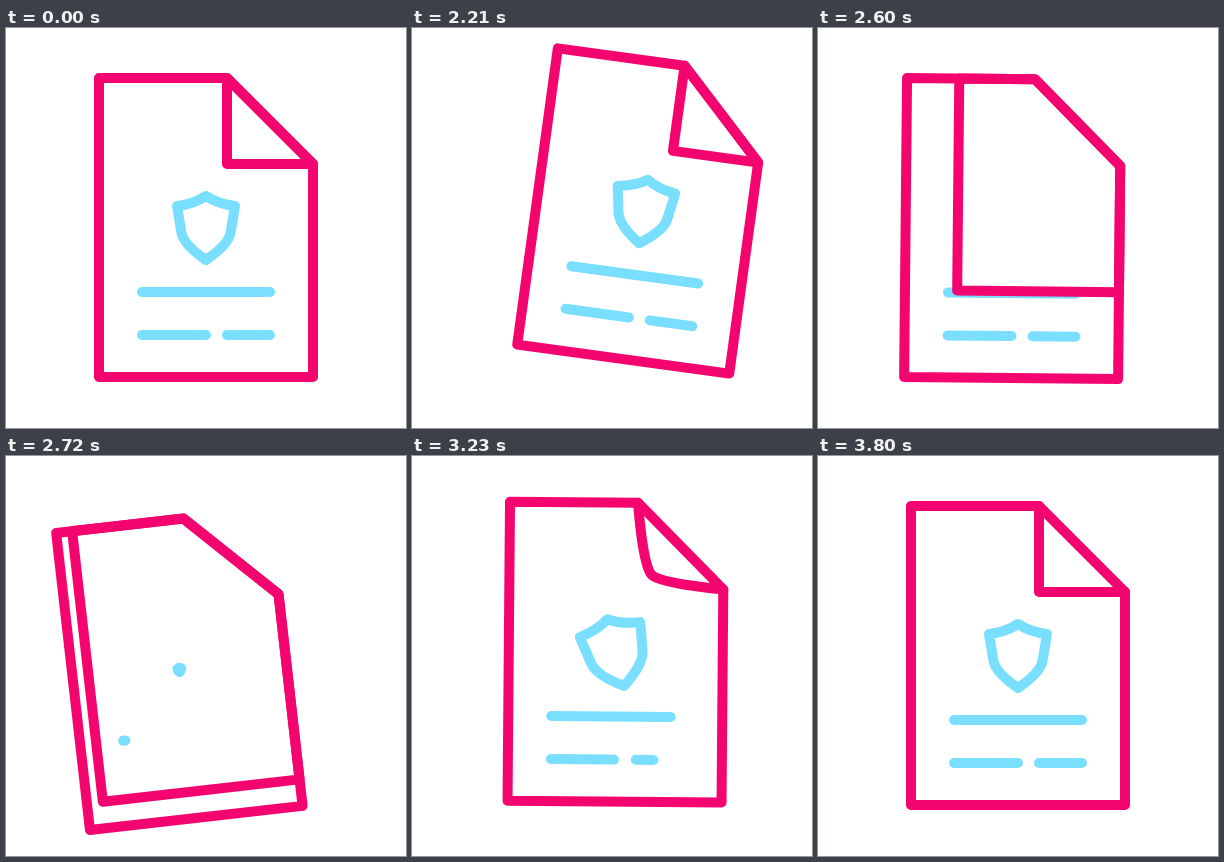
An HTML page with a canvas that plays this animation: 400x400 px, repeating every 3860 ms.

```html
<!DOCTYPE html>
<html lang="en">
<head>
<meta charset="utf-8">
<title>Protected document</title>
<style>
html, body { margin: 0; width: 100%; height: 100%; overflow: hidden; background: #fff; }
canvas { display: block; width: 100vmin; height: 100vmin; }
</style>
</head>
<body>
<canvas id="stage" width="400" height="400"></canvas>
<script>
const ctx = document.getElementById('stage').getContext('2d');
const PINK = '#f4046f', CYAN = '#7adfff';
const LOOP = 3860, HOLD = 2000, STEP = 30, LAST = 60;
const L = 93, R = 307, T = 50, B = 349;
const CX = 200, CY = 199.5, CUT = 86;

const clamp = v => Math.min(1, Math.max(0, v));
const mix = (a, b, p) => a + (b - a) * p;

// cubic-bezier(.333, 0, .25, 1)
function ease(u) {
  if (u <= 0) return 0;
  if (u >= 1) return 1;
  let lo = 0, hi = 1, s = 0.5;
  for (let i = 0; i < 24; i++) {
    s = (lo + hi) / 2;
    const q = 1 - s;
    const x = q * q * s + 0.75 * q * s * s + s * s * s;
    if (x < u) lo = s; else hi = s;
  }
  return s * s * (3 - 2 * s);
}

const span = (k, from, to) => ease(clamp((k - from) / (to - from)));

// keys: [step, value] pairs, eased between neighbours
function track(k, keys) {
  let v = keys[0][1];
  for (let i = 1; i < keys.length; i++) {
    const [from, a] = keys[i - 1], [to, b] = keys[i];
    if (k >= from) v = mix(a, b, span(k, from, to));
  }
  return v;
}

const MOVE_X = [[0, 0], [13, 39], [31, -36], [50, 14], [60, 0]];
const MOVE_Y = [[0, 0], [13.5, -21], [31.5, 20], [50, -10], [60, 0]];
const TILT = [[0, 0], [14, 10.2], [32, -10], [50, 3.7], [60, 0]];
const POP = [[22, 0], [38, 1.08], [60, 1]];
const TWIST = [[31, 0], [41, -14.5], [58, 0]];

function line(x1, x2, y, p) {
  if (p <= 0) return;
  ctx.beginPath();
  ctx.moveTo(x1, y);
  ctx.lineTo(mix(x1, x2, p), y);
  ctx.stroke();
}

function shield(scale, deg) {
  if (scale <= 0) return;
  ctx.save();
  ctx.translate(CX, 200);
  ctx.rotate(deg * Math.PI / 180);
  ctx.scale(scale, scale);
  ctx.beginPath();
  ctx.moveTo(0, -32);
  ctx.quadraticCurveTo(12, -24, 29, -22);
  ctx.lineTo(24.5, 5);
  ctx.quadraticCurveTo(22, 17, 0, 32);
  ctx.quadraticCurveTo(-22, 17, -24.5, 5);
  ctx.lineTo(-29, -22);
  ctx.quadraticCurveTo(-12, -24, 0, -32);
  ctx.closePath();
  ctx.restore();
  ctx.stroke();
}

function content(scale, deg, a, b, c) {
  ctx.strokeStyle = CYAN;
  shield(scale, deg);
  line(136, 264, 264, a);
  line(136, 200, 307, b);
  line(221, 264, 307, c);
}

// the flap spreads until it covers the whole sheet
function flapPath(p) {
  const x = mix(R - CUT, L, p), y = mix(T + CUT, B, p);
  ctx.beginPath();
  ctx.moveTo(R - CUT, T);
  ctx.lineTo(x, T);
  ctx.lineTo(x, y);
  ctx.lineTo(R, y);
  ctx.lineTo(R, T + CUT);
  ctx.closePath();
}

// a new corner curls inward from the diagonal
function curl(p) {
  const d = mix(CUT / 2, CUT, p), h = 28 * (1 - p);
  const x = R - d, y = T + d;
  ctx.beginPath();
  ctx.moveTo(R - CUT, T);
  ctx.bezierCurveTo(R - CUT, T, x - h, y - h, x, y);
  ctx.bezierCurveTo(x + h, y + h, R, T + CUT, R, T + CUT);
  ctx.stroke();
}

function sheet() {
  ctx.beginPath();
  ctx.moveTo(L, T);
  ctx.lineTo(R - CUT, T);
  ctx.lineTo(R, T + CUT);
  ctx.lineTo(R, B);
  ctx.lineTo(L, B);
  ctx.closePath();
  ctx.stroke();
}

function draw(k) {
  ctx.fillStyle = '#fff';
  ctx.fillRect(0, 0, 400, 400);
  ctx.save();
  ctx.translate(CX + track(k, MOVE_X), CY + track(k, MOVE_Y));
  ctx.rotate(track(k, TILT) * Math.PI / 180);
  ctx.translate(-CX, -CY);
  ctx.lineWidth = 10;
  ctx.lineCap = ctx.lineJoin = 'round';

  const turning = k < 31, flap = span(k, 13, 31);
  if (turning) {
    content(1, 0, 1, 1, 1);
    flapPath(flap);
    ctx.fill();
  }
  content(track(k, POP), track(k, TWIST),
    span(k, 22, 49), span(k, 24, 44), span(k, 34, 57));

  ctx.strokeStyle = PINK;
  if (turning) {
    flapPath(flap);
    ctx.stroke();
  }
  if (k >= 28) curl(span(k, 28, 58));
  sheet();
  ctx.restore();
}

const start = performance.now();
function tick() {
  const t = (performance.now() - start) % LOOP;
  const k = Math.floor((t - HOLD) / STEP);
  draw(Math.min(LAST, Math.max(0, k)));
  requestAnimationFrame(tick);
}
tick();
</script>
</body>
</html>
```
